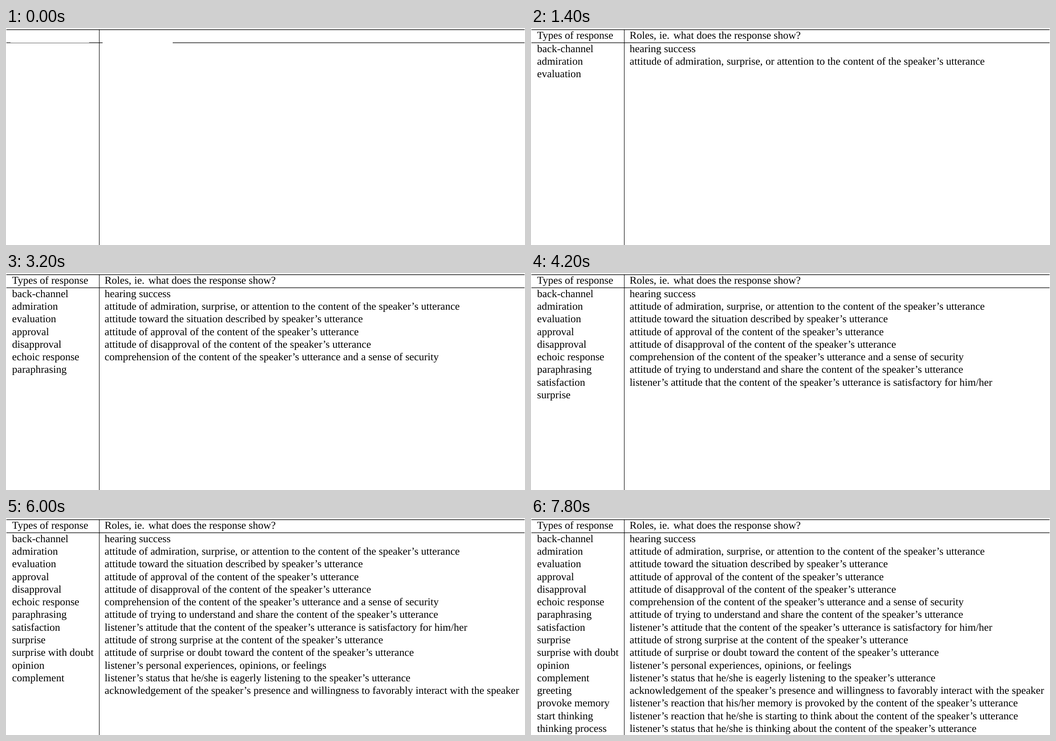
Write an HTML page that moves like this. It is 1155 by 485 pixels and loops after 8 s.

```html
<!DOCTYPE html>
<html lang="en">
<head>
<meta charset="utf-8">
<title>Types of response</title>
<style>
  html, body { margin: 0; width: 100%; height: 100%; overflow: hidden; background: #fff; }
  svg { display: block; width: 1155px; height: 485px; }
  text {
    font: 23.5px "Liberation Serif", "Times New Roman", serif;
    text-rendering: geometricPrecision;
    white-space: pre;
  }
</style>
</head>
<body>
<svg id="stage" viewBox="0 0 1155 485"></svg>
<script>
const STEP_MS = 200, STEPS = 40;
const COLUMNS = [13.6, 219.6];

// Extra space after punctuation, as in book typesetting.
const EXTRA_SPACE = { ".": 2.8, ",": 0.5 };

// Each row: left cell, right cell, optional reveal order of its pieces ("|" splits a cell).
const rows = [
  ["Types of response", "Roles, ie. what does the response show?"],
  ["back-channel", "hearing success"],
  ["admiration", "attitude of admiration, surprise, or attention to the content of the speaker’s utterance"],
  ["evaluation", "attitude toward the situation described by speaker’s utterance"],
  ["approval", "attitude of approval of the content of the speaker’s utterance"],
  ["disapproval", "attitude of disapproval of the content of the speaker’s utterance", "10"],
  ["echoic response", "comprehension of the content of the |speaker’s utterance and a sense of security"],
  ["paraphrasing", "attitude of trying to understand and |share the content of the speaker’s utterance"],
  ["satisfaction", "listener’s attitude that the content of the speaker’s utterance is satisfactory for him/her"],
  ["surprise", "attitude of strong surprise at the content of the speaker’s utterance"],
  ["surprise with doubt", "attitude of surprise or doubt toward the content of the speaker’s utterance"],
  ["opinion", "listener’s personal experiences, opinions, or feelings"],
  ["complement", "listener’s status that he/she is eagerly listening to the speaker’s utterance"],
  ["greeting", "acknowledgement of the speaker’s presence and |willingness to favorably interact with the speaker", "201"],
  ["provoke memory", "listener’s reaction that his/her memory is provoked by the content of the speaker’s utterance"],
  ["start |thinking", "listener’s reaction that he/she is starting to |think about the content of the speaker’s utterance", "3012"],
  ["thinking process", "listener’s status that he/she is thinking about the content of the speaker’s utterance"]
];

const stage = document.getElementById("stage");
const timed = [];

function add(parent, tag, attributes = {}) {
  const node = document.createElementNS(stage.namespaceURI, tag);
  for (const key in attributes) node.setAttribute(key, attributes[key]);
  return parent.appendChild(node);
}

function box(x, y, width, height, fill = "#000") {
  return add(stage, "rect", { x, y, width, height, fill });
}

function cover(x, y, width, height, from, until) {
  timed.push({ node: box(x, y, width, height, "#fff"), from, until });
}

function addPiece(line, text) {
  const piece = add(line, "tspan");
  let dx = 0;
  for (const phrase of text.split(/(?<=[.,] )/)) {
    add(piece, "tspan", { dx }).textContent = phrase;
    dx = EXTRA_SPACE[phrase.at(-2)] || 0;
  }
  return piece;
}

function addRow([left, right, order = "0123"], index, firstStep) {
  const y = index ? 53.7 + (index - 1) * 28.29 : 24;
  let count = 0;
  [left, right].forEach((cell, column) => {
    const line = add(stage, "text", { x: COLUMNS[column], y });
    for (const text of cell.split("|")) {
      const node = addPiece(line, text);
      timed.push({ node, from: firstStep + Number(order[count++]), until: STEPS });
    }
  });
  return firstStep + count;
}

box(1, 3, 1153, 1.4);
box(1, 32.35, 1153, 1.3);

// Parts of the rule hidden until the neighbouring cells appear.
cover(10, 31, 175, 2, 0, 1);
cover(215, 31, 156, 4, 0, 4);

rows.reduce((step, row, index) => addRow(row, index, step), 1);

// Descenders stay cut off until the line below arrives.
cover(215, 340, 510, 4, 26, 28);

box(207, 3, 1.1, 482);

function draw(now) {
  const step = Math.floor(now / STEP_MS) % STEPS;
  for (const { node, from, until } of timed) {
    node.setAttribute("visibility", step >= from && step < until ? "visible" : "hidden");
  }
}

const start = performance.now();
function tick() {
  draw(performance.now() - start);
  requestAnimationFrame(tick);
}
tick();
</script>
</body>
</html>
```
